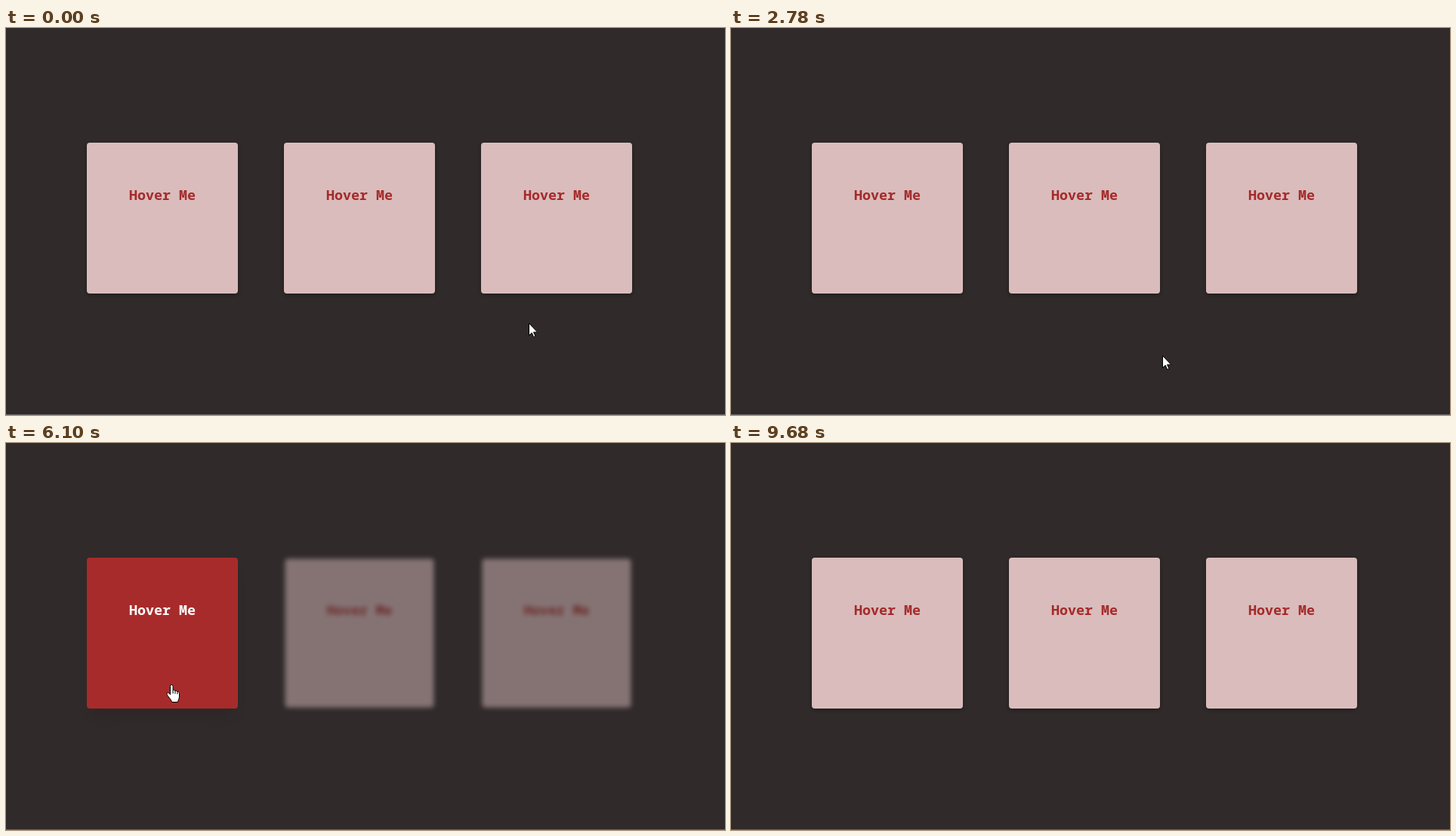
Animation, 952 px wide and 513 px high, one loop 9.93 s. Source, as an HTML page:

```html
<!DOCTYPE html>
<html lang="en">
<head>
<meta charset="utf-8">
<title>Hover cards</title>
<style>
  html, body { margin: 0; width: 100%; height: 100%; overflow: hidden; background: #302a2a; }
  body { position: relative; }
  body::after { content: ""; position: absolute; left: 0; top: 512px; width: 100%; height: 1px; background: #6b6666; }
  .card {
    position: absolute; top: 152px; width: 200px; height: 200px; border-radius: 4px;
    background: #dabcbc; color: #a52a2a; box-shadow: 0 2px 5px rgba(0, 0, 0, .3);
  }
  .card svg { display: block; width: 200px; height: 200px; }
  .card text { font: 600 18.33px "Noto Sans Mono", monospace; text-anchor: middle; fill: currentColor; }
  .card.on { background: #a82b2b; color: #fff; box-shadow: 0 14px 20px -8px rgba(0, 0, 0, .12); }
  .card.dim { filter: blur(3px); opacity: .5; transform: scale(.985); box-shadow: none; }
  #cursor { position: absolute; left: 0; top: 0; width: 952px; height: 513px; }
  #cursor path { fill: #fff; stroke: #000; stroke-linejoin: round; }
</style>
</head>
<body>
<svg id="cursor">
  <g id="pointer">
    <path id="arrow" d="M.5 .5V16.5L4.2 13L6.7 18.6L9 17.6L6.5 12.2H11.7Z"/>
    <g id="hand" transform="translate(-7 -1)">
      <path d="M5.5 2.3a1.8 1.8 0 0 1 3.6 0V8C9.6 6.9 12 7.2 12 9C12.5 8 15 8.4 15 10C15.5 9.3 17.5 9.8 17.5 11.5V16C17.5 19 16 20 15.5 23.5H7.5C7 20.5 5 19 2.5 15.5C1 13.5 .5 12 1.2 11.4C2.5 10.3 4.5 12 5.5 13.5Z"/>
      <path d="M9.1 8v4M12 9v3.5M15 10v3"/>
    </g>
  </g>
</svg>
<script>
const LOOP = 9930, GAP = 120, SIZE = 200, TOP = 152, MARGIN = 30;
const lefts = [0, 1, 2].map(i => 107 + 261 * i);

const linear = u => u;
const easeOut = u => 1 - (1 - u) ** 2;
const easeIn = u => u ** 1.7;

// Each move is a Bezier curve from the last resting place, taken in discrete steps.
const moves = [];
let rest = [692, 391];
function move(start, steps, points, ease = linear) {
  moves.push({ start, steps, ease, curve: [rest, ...points] });
  rest = points.at(-1);
}
const nudge = start => move(start, 1, [[rest[0], rest[1] - 2]]);

move(0, 1, [rest]);
move(120, 3, [[686, 318]], easeOut);
move(1390, 8, [[771, 331], [586, 466]]);
move(2780, 5, [[510, 305]]);
nudge(3510);
move(4130, 11, [[570, 400], [220, 593], [216, 365]]);
move(5480, 2, [[219, 323]]);
nudge(6100);
move(6740, 9, [[290, 500], [540, 510], [689, 326]]);
move(8700, 9, [[590, 500], [880, 440], [866, 520]], easeIn);

function bezier(points, u) {
  if (points.length === 1) return points[0];
  const mix = (a, b) => a + (b - a) * u;
  const inner = points.slice(1).map(([x, y], i) => [mix(points[i][0], x), mix(points[i][1], y)]);
  return bezier(inner, u);
}

function pointerAt(t) {
  const { start, steps, ease, curve } = moves.findLast(m => m.start <= t);
  const step = Math.min(steps, 1 + Math.floor((t - start) / GAP));
  return bezier(curve, ease(step / steps)).map(Math.round);
}

const $ = id => document.getElementById(id);
const cursor = $("cursor"), pointer = $("pointer"), arrow = $("arrow"), hand = $("hand");

const cards = lefts.map(left => {
  const card = document.createElement("div");
  card.style.left = left + "px";
  card.innerHTML = '<svg><text x="100" y="76">Hover Me</text></svg>';
  cursor.before(card);
  return card;
});

const within = (v, from, to) => v >= from && v <= to;

function draw() {
  const [x, y] = pointerAt(performance.now() % LOOP);
  const inside = within(x, lefts[0] - MARGIN, lefts[2] + SIZE + MARGIN) &&
                 within(y, TOP - MARGIN, TOP + SIZE + MARGIN);
  const active = within(y, TOP, TOP + SIZE)
    ? lefts.findIndex(left => within(x, left, left + SIZE)) : -1;

  cards.forEach((card, i) => {
    card.className = "card" + (i === active ? " on" : inside ? " dim" : "");
  });
  pointer.setAttribute("transform", `translate(${x} ${y})`);
  arrow.style.display = active < 0 ? "" : "none";
  hand.style.display = active < 0 ? "none" : "";
  requestAnimationFrame(draw);
}
draw();
</script>
</body>
</html>
```
